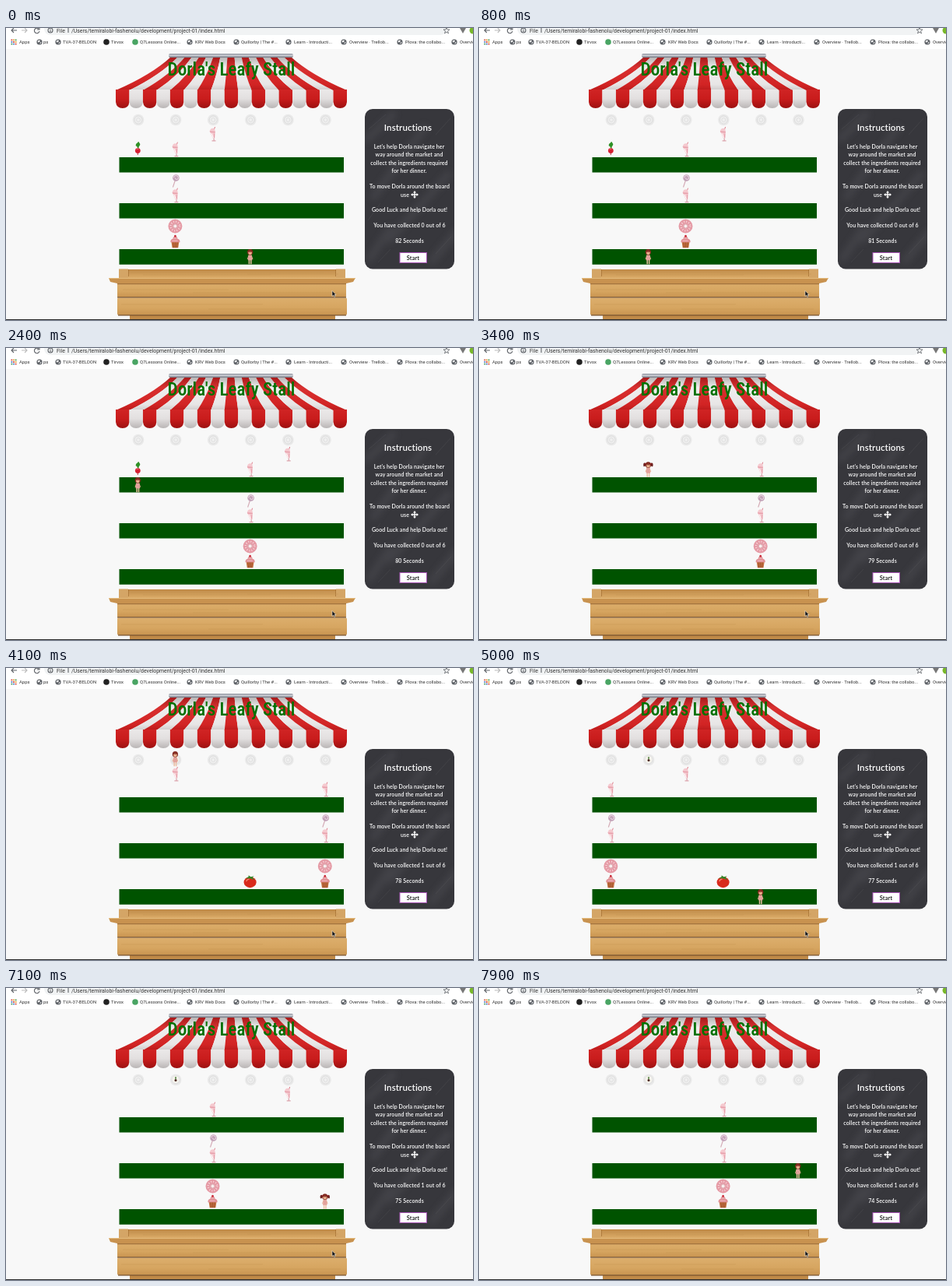
These frames come from a looping animation (600 px wide and 375 px high, 8000 ms). An HTML page:

```html
<!DOCTYPE html>
<html lang="en">
<head>
<meta charset="utf-8">
<title>Veggie game</title>
<style>
  html, body { margin: 0; width: 100%; height: 100%; overflow: hidden; background: #f8f8f8; }
  svg { display: block; width: 100vw; height: 100vh; }
  .bar { font: 5.9px Roboto, sans-serif; fill: #333; }
  .url { font: 6.9px Roboto, sans-serif; fill: #333; }
  .title { font: 500 23px "Roboto Condensed", Roboto, sans-serif; font-stretch: 75%; fill: #007000; text-anchor: middle; }
  .chalk { font: 600 7px Lato, sans-serif; letter-spacing: .1px; fill: #fff; text-anchor: middle; }
  .chalk .head { font-size: 11.5px; }
  .chalk .start { font-size: 7.5px; fill: #111; }
</style>
</head>
<body>
<svg viewBox="0 0 600 375" preserveAspectRatio="none">
  <defs>
    <linearGradient id="red" x2="0" y1="38" y2="81" gradientUnits="userSpaceOnUse">
      <stop stop-color="#a81c1c"/><stop offset=".3" stop-color="#d83030"/>
      <stop offset=".8" stop-color="#d22424"/><stop offset="1" stop-color="#b81a1a"/>
    </linearGradient>
    <linearGradient id="white" x2="0" y1="38" y2="81" gradientUnits="userSpaceOnUse">
      <stop stop-color="#b8b6b6"/><stop offset=".3" stop-color="#efeeee"/>
      <stop offset=".8" stop-color="#e8e6e6"/><stop offset="1" stop-color="#cbc8c8"/>
    </linearGradient>
    <linearGradient id="redFlap" x2="0" y2="1">
      <stop stop-color="#d02424"/><stop offset=".5" stop-color="#c91c1c"/><stop offset="1" stop-color="#9c1010"/>
    </linearGradient>
    <linearGradient id="whiteFlap" x2="0" y2="1">
      <stop stop-color="#ebe9e9"/><stop offset=".5" stop-color="#e2dfdf"/><stop offset="1" stop-color="#b9b5b5"/>
    </linearGradient>
    <linearGradient id="metal" x2="0" y2="1">
      <stop stop-color="#777c88"/><stop offset=".4" stop-color="#d6d8de"/><stop offset="1" stop-color="#6d717c"/>
    </linearGradient>
    <linearGradient id="wood" x2="0" y2="1">
      <stop stop-color="#dcae6c"/><stop offset=".6" stop-color="#d6a560"/><stop offset="1" stop-color="#c99450"/>
    </linearGradient>
    <linearGradient id="top" x2="0" y2="1">
      <stop stop-color="#bf8a48"/><stop offset="1" stop-color="#dbab68"/>
    </linearGradient>
    <filter id="soft" x="-50%" y="-50%" width="200%" height="200%"><feGaussianBlur stdDeviation="5"/></filter>
    <clipPath id="board"><rect x="461" y="104" width="115" height="205.500" rx="10"/></clipPath>

    <g id="globe"><circle r="3.600" fill="#5f6368"/><path d="M-2.500-1Q-1-3 1-2L0 0-1.500.5ZM1 .5L2.500 0Q2 2 .5 2.500Z" fill="#fff"/></g>

    <g id="shake">
      <path d="M1.500-5L3-9.500" stroke="#dd7a88" stroke-width="1"/>
      <path d="M-3.800-4Q-3-8 .5-7.800 3.500-7 3.200-3L2.800 5H.3Z" fill="#f5c9cf"/>
      <path d="M-3.800-4L3.200-3.500 3.100-2-3.200-2.500Z" fill="#e7a0ab"/>
      <path d="M-1.500-1L1 4.500" stroke="#fff" stroke-width=".9"/>
      <path d="M2.200-1L2 4.500" stroke="#e395a1" stroke-width=".9"/>
      <path d="M1.600 5V8M-1 8.500H4" stroke="#dba3ac" stroke-width="1.200"/>
    </g>
    <g id="lolly">
      <path d="M0 0L-3 9" stroke="#d3a9b4" stroke-width="1.100"/>
      <circle cx="1" cy="-3" r="4.300" fill="#c2a2b8"/>
      <path d="M-2-3a3 3 0 0 1 6 0 2 2 0 0 1-4 0" fill="none" stroke="#f1dfe8"/>
    </g>
    <g id="donut">
      <circle r="6" fill="none" stroke="#e59aa5" stroke-width="6"/>
      <circle r="5.800" fill="none" stroke="#f7d3d8" stroke-width="2.500" stroke-dasharray="1 2.037"/>
      <circle r="2.600" fill="#f8eeee" stroke="#cf808b" stroke-width=".8"/>
    </g>
    <g id="cupcake">
      <path d="M-5 0H5L3.800 8H-3.800Z" fill="#c4703f"/>
      <path d="M-2.500 1L-2 8M0 1V8M2.500 1L2 8" stroke="#8d4526" stroke-width=".7"/>
      <path d="M-6 1Q-6.500-3-3-3.500-3-6.500 0-7 3-6.500 3-3.500 6.500-3 6 1Z" fill="#e08f94"/>
      <path d="M-4-1H3M-2-4H2" stroke="#f0bcc0" stroke-width="1"/>
      <circle cy="-7" r="1.300" fill="#c92634"/>
    </g>
    <g id="radish">
      <path d="M0 1Q-.5-3-2.500-3-3-6-.5-7 1-10 2-7 4-5 2-3 1-2 1 1Z" fill="#2f9127"/>
      <circle cy="3" r="3.400" fill="#d51f31"/><path d="M0 6V8.500" stroke="#b8303d"/>
      <path d="M-2 2Q-1 0 1 1" fill="none" stroke="#f08087" stroke-width=".8"/>
    </g>
    <g id="tomato">
      <ellipse cy="1" rx="8" ry="7" fill="#d92a1c"/>
      <path d="M-5 0Q-4-3-1-3" fill="none" stroke="#f3806d" stroke-width="1.300"/>
      <path d="M0-4L-6-4-2-6-2-8 1-6 5-7 3-5 6-2Z" fill="#348527"/>
    </g>
    <g id="girl">
      <path d="M-1.200 3V9.500M1.200 3V9.500" stroke="#eebfa4" stroke-width="1.500"/>
      <path d="M-1.500-2L-3.200 3M1.500-2L3.200 3" stroke="#e8b195" stroke-width="1.200"/>
      <path d="M-1.800-2.500H1.800L2.800 4.500H-2.800Z" fill="#e3a29c"/>
      <ellipse cy="-6" rx="3.600" ry="3.800" fill="#81281f"/>
      <circle cy="-5" r="2.400" fill="#e8b08c"/>
      <path d="M-2.600-6Q0-8.500 2.600-6" fill="#81281f"/>
    </g>
    <g id="tails">
      <path d="M-2.500-8Q-7-10-6-4.500-4.500-3-3-6ZM2.500-8Q7-10 6-4.500 4.500-3 3-6Z" fill="#6b1f1d"/>
      <path d="M-3.800-7.500h1.400M2.400-7.500h1.400" stroke="#d52838" stroke-width="1.500"/>
    </g>
  </defs>

  <rect width="600" height="375" fill="#f8f8f8"/>
  <rect width="600" height="27" fill="#fff"/>
  <rect x="49" y="-8" width="517" height="17" rx="8" fill="#f1f3f4"/>
  <g fill="none" stroke="#5f6368" stroke-width="1.100">
    <path d="M14 3H7M10 0L7 3 10 6"/><path d="M20 3H27M24 0L27 3 24 6" stroke="#bbb"/>
    <path d="M42 1A3.300 3.300 0 1 0 43 4M43-1V2H40"/>
    <circle cx="57" cy="3" r="3"/><path d="M57 2.500V5M57 .7V1.700M80 0V6"/>
    <path d="M566-1L567 2H570L567.500 4 568.500 7 566 5 563.500 7 564.500 4 562 2H565Z" stroke-width=".8"/>
  </g>
  <path d="M583 0H591L587 7Z" fill="#777"/>
  <circle cx="600" cy="3" r="4.500" fill="#78b82a"/>
  <text class="url" x="65" y="5.800">File</text>
  <text class="url" x="84" y="5.800">/Users/temiralobi-fashenolu/development/project-01/index.html</text>
  <g id="marks" class="bar"></g>

  <g id="awning"></g>
  <rect x="209" y="33" width="160" height="5" rx="2" fill="url(#metal)"/>
  <text class="title" x="289.500" y="61">Dorla's Leafy Stall</text>

  <g id="plates"></g>
  <g id="picked"><circle cx="218" cy="117.500" r="4.500" fill="#f5f3ec"/><path d="M218 114V117" stroke="#3a7028" stroke-width="1.300"/><circle cx="218" cy="118.500" r="1.500" fill="#49271f"/></g>
  <path d="M145.500 166H434V185.500H145.500ZM145.500 225H434V244.500H145.500ZM145.500 284H434V303.700H145.500Z" fill="#005300"/>

  <path d="M157 310H424L436 321H145Z" fill="url(#top)"/>
  <path d="M145 309.500H157V321H145ZM424 309.500H436V321H424Z" fill="#d4a566"/>
  <path d="M157.500 310V319M423.500 310V319" stroke="#a87436" stroke-width=".8"/>
  <rect x="143" y="327" width="294" height="18.500" rx="1" fill="url(#wood)"/>
  <rect x="143" y="346.500" width="295" height="22" rx="1.500" fill="url(#wood)"/>
  <rect x="159" y="369" width="264" height="6" fill="#c08a48"/>
  <path d="M143 345.800H437M144 368.800H437" stroke="#74491e" stroke-width="1.200"/>
  <path d="M143 328.500H437" stroke="#8b5d2c" stroke-width="1.600" opacity=".7"/>
  <path d="M132 321H449L446 326 437 328H143L134 326Z" fill="#c8924f"/>
  <path d="M132 321.500H449" stroke="#e3ba7b"/>
  <path d="M160 314H408M176 317H340M310 316H427M150 336H286M240 340H427M148 355H330M260 361H430" stroke="#c59453" stroke-width=".6" opacity=".7"/>
  <rect y="374" width="600" height="1" fill="#2a2a2a"/>

  <g clip-path="url(#board)">
    <rect x="461" y="104" width="115" height="206" fill="#37373c"/>
    <g fill="none" stroke="#8a8a92" stroke-width="10" opacity=".14" filter="url(#soft)">
      <path d="M462 145L500 108M470 220L540 125M490 275L571 185M465 300L495 255M545 302L580 260"/>
    </g>
    <g stroke="#aaa" stroke-width=".5" opacity=".2"><path d="M466 130L488 111M552 137L571 116M465 247L481 225M552 290L572 268M478 301L494 284"/></g>
  </g>
  <rect x="506" y="288.500" width="34.500" height="13" fill="#fff" stroke="#a855b5"/>
  <g class="chalk">
    <text class="head" x="516.500" y="131.500">Instructions</text>
    <text x="518" y="154.500">Let's help Dorla navigate her</text>
    <text x="518" y="165">way around the market and</text>
    <text x="518" y="175.500">collect the ingredients required</text>
    <text x="518" y="186">for her dinner.</text>
    <text x="518.500" y="206">To move Dorla around the board</text>
    <text x="512.500" y="216.500">use</text>
    <text x="518.500" y="236">Good Luck and help Dorla out!</text>
    <text id="count" x="518.500" y="256"></text>
    <text id="clock" x="518.500" y="275.500"></text>
    <text class="start" x="523" y="297.500">Start</text>
  </g>
  <path d="M525 209L527 211.500H525.700V213.300H527.500V212L530 214 527.500 216V214.700H525.700V216.500H527L525 219 523 216.500H524.300V214.700H522.500V216L520 214 522.500 212V213.300H524.300V211.500H523Z" fill="#fff"/>

  <g id="game"></g>
  <path d="M419 337.500V344.500L420.700 343 421.800 345.500 423 345 422 342.500H424Z" fill="#111" stroke="#fff" stroke-width=".5"/>
</svg>

<script>
  const LOOP = 8000, TICK_SHIFT = 200;
  const PICK_RADISH = 2700, DELIVER = 3900, PICK_TOMATO = 5600;
  const $ = id => document.getElementById(id);
  const colX = c => 169.3 + 48.1 * c;
  const rowY = r => 116.8 + 19.67 * r;

  function add(parent, tag, attrs, text) {
    const el = document.createElementNS('http://www.w3.org/2000/svg', tag);
    for (const key in attrs) el.setAttribute(key, attrs[key]);
    if (text) el.textContent = text;
    parent.append(el);
    return el;
  }

  // Bookmarks: icon x, text x, label, icon (symbol name or colour)
  const marks = [
    [43, 48, 'ps', 'globe'], [67, 73, 'TVA-37-BELDON', 'globe'],
    [129, 135, 'Tirvox', '#222'], [166, 172, 'Q7Lessons Online...', '#4aa564'],
    [236, 243, 'KRV Web Docs', 'globe'], [296, 302, 'Quillorby | The #...', 'globe'],
    [363, 370, 'Learn - Introducti...', 'globe'], [434, 441, 'Overview · Trellob...', 'globe'],
    [506, 513, 'Plova: the collabo...', 'globe'], [576, 583, 'Overview', 'globe']
  ];
  const colours = ['#d94b3d', '#e5a63a', '#4b9c58', '#4b7fd1'];
  for (let i = 0; i < 9; i++)
    add($('marks'), 'rect', { x: 6.5 + i % 3 * 2.6, y: 14.5 + (i / 3 | 0) * 2.6, width: 1.8, height: 1.8, fill: colours[i % 4] });
  add($('marks'), 'text', { x: 17, y: 20.3 }, 'Apps');
  for (const [iconX, x, label, icon] of marks) {
    if (icon[0] === '#') add($('marks'), 'circle', { cx: iconX, cy: 18, r: 3.8, fill: icon });
    else add($('marks'), 'use', { href: '#' + icon, x: iconX, y: 18 });
    add($('marks'), 'text', { x, y: 20.3 }, label);
  }

  // Awning stripes fan out from the rail and end in round flaps
  const STRIPES = 17, step = 297 / STRIPES;
  for (let i = 0; i < STRIPES; i++) {
    const top = n => 212 + n * 154 / STRIPES;
    const low = n => 141 + n * step;
    const mid = n => top(n) + .35 * (low(n) - top(n));
    const paint = i % 2 ? 'white' : 'red';
    add($('awning'), 'path', {
      d: `M${top(i)} 37H${top(i + 1)}Q${mid(i + 1)} 60 ${low(i + 1)} 80H${low(i)}Q${mid(i)} 60 ${top(i)} 37Z`,
      fill: `url(#${paint})`
    });
    add($('awning'), 'path', {
      d: `M${low(i)} 79h${step}v16q-1 8-${step / 2} 8t-${step / 2}-8Z`,
      fill: `url(#${paint}Flap)`
    });
  }

  for (let c = 0; c < 6; c++) {
    const cx = colX(c) + .7, cy = 118;
    add($('plates'), 'circle', { cx, cy, r: 7.3, fill: '#e9e9e9' });
    add($('plates'), 'circle', { cx, cy, r: 5, fill: '#efefef', stroke: '#d8d8d8', 'stroke-width': .8 });
    add($('plates'), 'circle', { cx, cy, r: 2.5, fill: 'none', stroke: '#dcdcdc', 'stroke-width': .8 });
  }

  const sprite = name => add($('game'), 'use', { href: '#' + name });
  const place = (el, c, r) => el.setAttribute('transform', `translate(${colX(c)} ${rowY(r)})`);
  const show = (el, on) => el.setAttribute('visibility', on ? 'visible' : 'hidden');

  const radish = sprite('radish'), tomato = sprite('tomato');
  place(radish, 0, 1.92);
  place(tomato, 3, 8);
  const column = [['shake', 2], ['lolly', 4], ['shake', 5], ['donut', 7], ['cupcake', 8]]
    .map(([name, row]) => ({ el: sprite(name), row }));
  const runner = sprite('shake');
  const girl = add($('game'), 'g', {});
  const tails = add(girl, 'use', { href: '#tails' });
  add(girl, 'use', { href: '#girl' });

  // Player moves: time, column, row (column -1 is off the board)
  const moves = [
    [0, 3, 9], [500, 2, 9], [700, 1, 9], [900, 0, 9], [1200, 0, 8], [1400, 0, 7],
    [1800, 0, 6], [1950, 0, 5], [2100, 0, 4], [2300, 0, 3], [PICK_RADISH, 0, 2],
    [3200, 1, 2], [3600, 1, 1], [DELIVER, 1, 0], [4200, 3, 9], [4600, 4, 9],
    [5300, 4, 8], [PICK_TOMATO, 3, 8], [5900, 4, 8], [6200, -1, 8], [6500, 5, 9],
    [6800, 5, 8], [7200, 5, 7], [7600, 5, 6]
  ];
  const RUNNER_COLS = [2, 3, 4, -1, 1];

  function draw(t) {
    const tick = Math.floor((t + TICK_SHIFT) / 1000);
    for (const { el, row } of column) place(el, (tick + 1) % 6, row);

    const runCol = RUNNER_COLS[tick % 5];
    show(runner, runCol >= 0);
    place(runner, runCol, 1);

    const [, c, r] = moves.filter(m => m[0] <= t).pop();
    girl.style.display = c < 0 ? 'none' : '';
    place(girl, c, r);
    show(tails, r % 3 > 0);

    show(radish, t < PICK_RADISH);
    show(tomato, t >= DELIVER && t < PICK_TOMATO);
    show($('picked'), t >= DELIVER);
    $('count').textContent = `You have collected ${t < DELIVER ? 0 : 1} out of 6`;
    $('clock').textContent = `${82 - tick} Seconds`;
  }

  const begin = performance.now();
  function frame() {
    draw((performance.now() - begin) % LOOP);
    requestAnimationFrame(frame);
  }
  frame();
</script>
</body>
</html>
```
